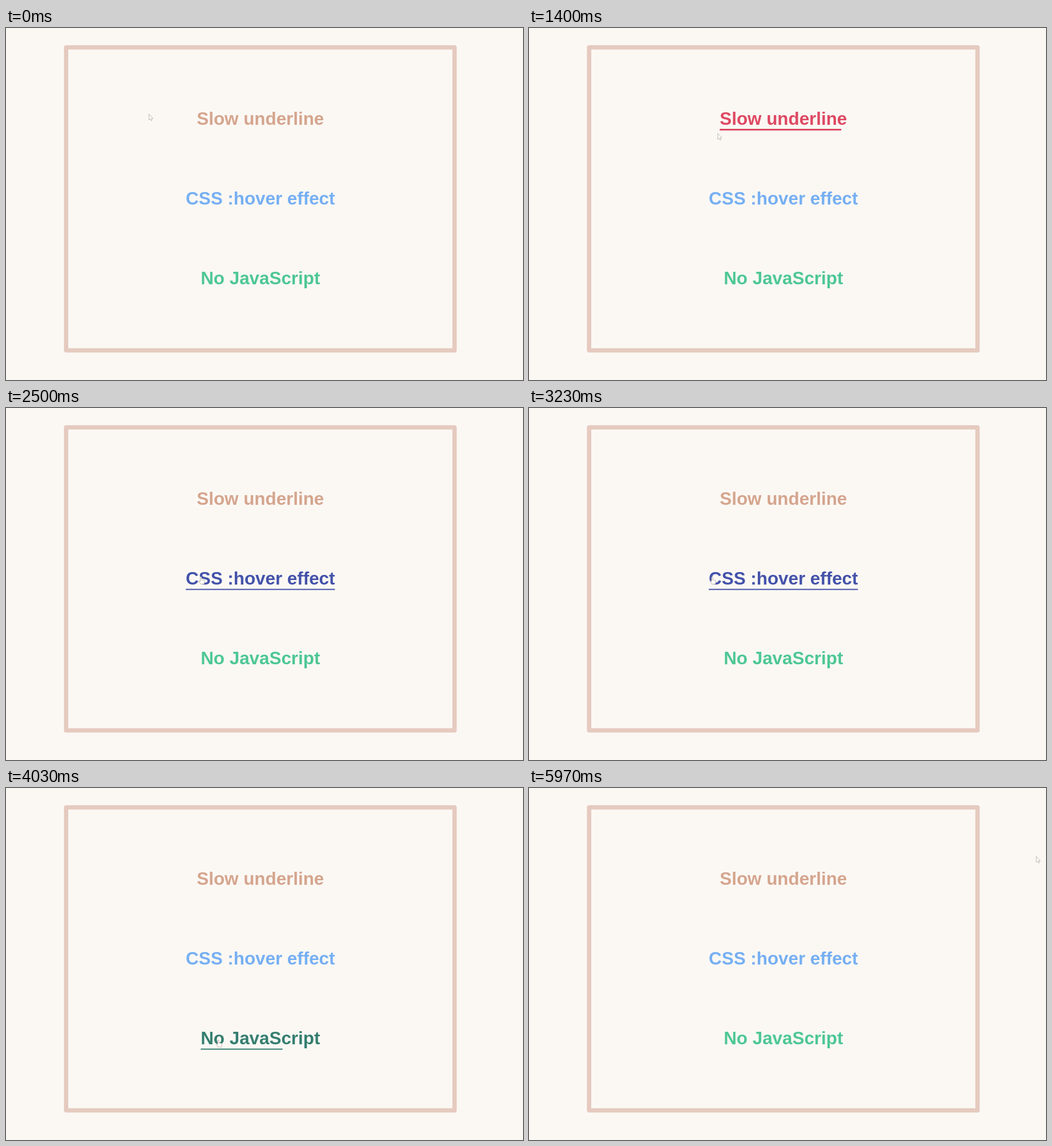
Animation, 906 px wide and 618 px high, one loop 6.01 s. Source, as an HTML page:

```html
<!DOCTYPE html>
<html lang="en">
<head>
<meta charset="utf-8">
<title>Slow underline</title>
<style>
  html, body { margin: 0; width: 100%; height: 100%; overflow: hidden; }
  body { background: #fbf8f4; }
  svg { display: block; width: 906px; height: 618px; }
  text {
    font: bold 31.36px "Liberation Sans", Arial, sans-serif;
    text-anchor: middle;
  }
</style>
</head>
<body>
<svg viewBox="0 0 906 618">
  <rect x="105.3" y="34" width="680.7" height="532" fill="none" stroke="#e6cabf" stroke-width="7.6" stroke-linejoin="round"/>
  <g id="links"></g>
  <g id="cursor" fill="#fffefa" stroke="#b4b0a8" stroke-width=".9" stroke-linejoin="round">
    <path id="arrow" d="M0 0V10.2L2.3 8.4L4 11.8L5.6 11L4.2 7.8H7.2Z"/>
    <path id="hand" d="M-1 0Q0 -1.4 1 0V4.4L5.6 5.6Q6.6 6 6.4 7.4L5.6 12H-.4L-3.6 7.4Q-3.6 6 -2.4 6.4L-1 7.6Z"/>
  </g>
</svg>
<script>
const LOOP = 6010, FADE = 500, CENTER = 445.8, FIRST_LINE = 170.4, GAP = 140;
const $ = id => document.getElementById(id);

// on / off: when the pointer enters and leaves the link
const links = [
  { text: 'Slow underline', rest: [213, 165, 142], hover: [222, 69, 96], bar: 3, on: 150, off: 1370 },
  { text: 'CSS :hover effect', rest: [118, 175, 243], hover: [68, 82, 170], bar: 2, on: 2010, off: 3300 },
  { text: 'No JavaScript', rest: [78, 199, 148], hover: [42, 92, 94], bar: 2, on: 3830, off: 5400 }
];

// key points of the pointer tip: time, x, y
const path = [
  [0, 250, 151], [150, 334, 160], [730, 355, 171], [1370, 334, 180], [1870, 283, 262],
  [1970, 312, 277], [2200, 350, 297], [3230, 321, 297], [4030, 372, 443],
  [5070, 361, 444], [5400, 338, 438], [5700, 256, 320], [5970, 889, 120], [LOOP, 889, 120]
];

const mix = (a, b, p) => a + (b - a) * p;

// the CSS "ease" curve, cubic-bezier(.25, .1, .25, 1), solved by bisection
function ease(x) {
  if (x <= 0) return 0;
  if (x >= 1) return 1;
  const curve = (a, b, u) => 3 * a * u * (1 - u) ** 2 + 3 * b * u * u * (1 - u) + u ** 3;
  let lo = 0, hi = 1;
  for (let i = 0; i < 20; i++) {
    const mid = (lo + hi) / 2;
    if (curve(.25, .25, mid) < x) lo = mid; else hi = mid;
  }
  return curve(.1, 1, lo);
}

function add(tag, attrs) {
  const el = document.createElementNS('http://www.w3.org/2000/svg', tag);
  for (const k in attrs) el.setAttribute(k, attrs[k]);
  return $('links').appendChild(el);
}

links.forEach((link, i) => {
  const y = FIRST_LINE + GAP * i;
  link.label = add('text', { x: CENTER, y });
  link.label.textContent = link.text;
  link.width = link.label.getComputedTextLength();
  link.line = add('rect', { x: CENTER - link.width / 2, y: y + 8.1 - link.bar / 2, height: link.bar });
});

function pointer(t) {
  const i = Math.max(1, path.findIndex(p => p[0] >= t));
  const [t0, x0, y0] = path[i - 1], [t1, x1, y1] = path[i];
  const k = (t - t0) / (t1 - t0);
  return [mix(x0, x1, k), mix(y0, y1, k)];
}

function draw(t) {
  for (const { on, off, rest, hover, label, line, width } of links) {
    const p = ease((t - on) / FADE) - ease((t - off) / FADE);
    const color = `rgb(${rest.map((c, i) => Math.round(mix(c, hover[i], p)))})`;
    label.setAttribute('fill', color);
    line.setAttribute('fill', color);
    line.setAttribute('width', width * p);
  }
  const hovering = links.some(({ on, off }) => t >= on && t < off);
  $('cursor').setAttribute('transform', `translate(${pointer(t)})`);
  $('arrow').style.display = hovering ? 'none' : '';
  $('hand').style.display = hovering ? '' : 'none';
}

const start = performance.now();
function tick() {
  draw((performance.now() - start) % LOOP);
  requestAnimationFrame(tick);
}
tick();
</script>
</body>
</html>
```
